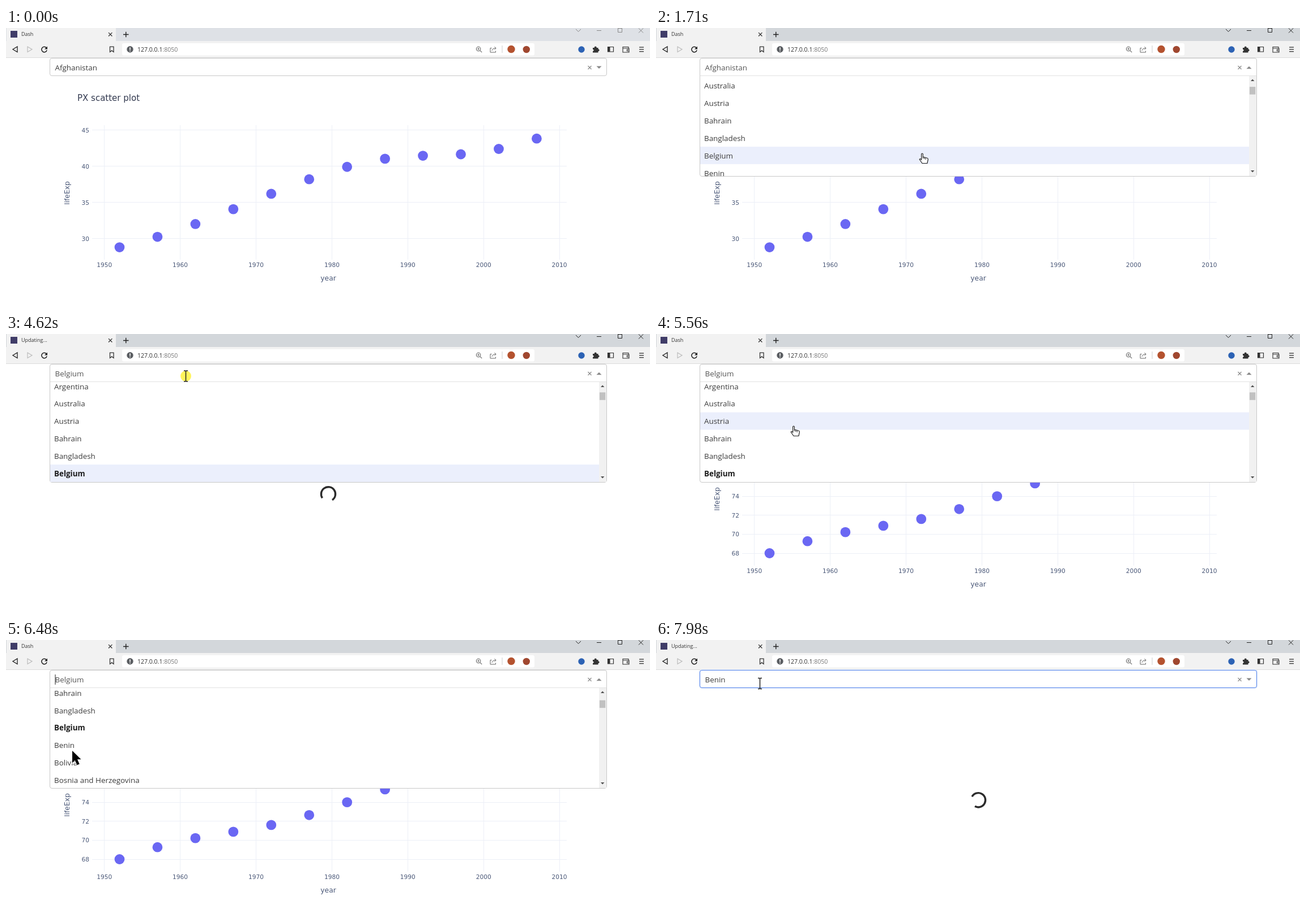
An HTML page with a canvas for the animation above (8000 ms loop, 1137 px wide and 492 px high).

```html
<!DOCTYPE html>
<html lang="en">
<head>
<meta charset="utf-8">
<title>Country chart</title>
<style>
html, body { margin: 0; width: 100%; height: 100%; overflow: hidden; background: #fff; }
canvas { display: block; }
</style>
</head>
<body>
<canvas id="stage" width="1137" height="492"></canvas>
<script>
const c = document.getElementById('stage').getContext('2d');
const LOOP = 8000, ROW = 30.83, LIST_TOP = 80.6, BLINK = 530;
const UI = '"Open Sans", "Noto Sans", sans-serif', PLOT = '"DejaVu Sans", sans-serif';
const countries = ['Afghanistan', 'Albania', 'Algeria', 'Angola', 'Argentina', 'Australia', 'Austria',
  'Bahrain', 'Bangladesh', 'Belgium', 'Benin', 'Bolivia', 'Bosnia and Herzegovina', 'Botswana', 'Brazil'];

// Each visit: menu opens, caret starts blinking, wheel turns, country is picked
const visits = [
  { open: 660, caret: 660, wheel: [1150, 1560], from: 0, by: 148, pick: 2130, before: 0, after: 9 },
  { open: 4600, caret: 5020, wheel: [5865, 6480], from: 127, by: 91.3, pick: 6860, before: 9, after: 10 }
];
const LOADED = 5250, TITLE_RESET = 5500;

// A straight trend plus sine waves that vanish at both ends
const charts = {
  0: { ends: [28.8, 43.83], waves: [2.25, -.22, -.67, .21, -.12], from: 30, to: 45, step: 5, y0: 372.7, unit: 12.8 },
  9: { ends: [68, 79.44], waves: [-.2, -.14, .22, .21], from: 68, to: 80, step: 2, y0: 388, unit: 16.82 }
};

// Pointer journey: depart, arrive, x, y
const home = [500, 72];
const trips = [[830, 1080, 495, 166], [1300, 1580, 470, 222], [2200, 2780, 293.5, 77.5], [2900, 3650, 317.5, 74.5],
  [4750, 5290, 243, 163], [5930, 6400, 117, 196], [6920, 7550, 183.5, 77]];

const progress = (t, a, b) => Math.min(1, Math.max(0, (t - a) / (b - a)));
const smooth = u => u * u * (3 - 2 * u);
const easeOut = u => 1 - (1 - u) ** 3;

function pointer(t) {
  return trips.reduce(([x, y], [a, b, tx, ty]) => {
    const u = smooth(progress(t, a, b));
    return [x + (tx - x) * u, y + (ty - y) * u];
  }, home);
}

function rect(x, y, w, h, color) {
  c.fillStyle = color;
  c.fillRect(x, y, w, h);
}
function box(x, y, w, h, r, fill, stroke) {
  c.beginPath();
  c.roundRect(x, y, w, h, r);
  if (fill) { c.fillStyle = fill; c.fill(); }
  if (stroke) { c.strokeStyle = stroke; c.lineWidth = 1; c.stroke(); }
}
function disc(x, y, r, color) {
  c.beginPath();
  c.arc(x, y, r, 0, 7);
  c.fillStyle = color;
  c.fill();
}
function line(d, color = '#333', width = 1.2) {
  c.strokeStyle = color;
  c.lineWidth = width;
  c.stroke(new Path2D(d));
}
function shape(d, color) {
  c.fillStyle = color;
  c.fill(new Path2D(d));
}
function cross(x, y, r, color, width) {
  line(`M${x - r} ${y - r}l${2 * r} ${2 * r}m0 ${-2 * r}l${-2 * r} ${2 * r}`, color, width);
}
// Triangle with its base centred on x, y; negative h points up
function triangle(x, y, w, h, color) {
  shape(`M${x - w / 2} ${y}h${w}l${-w / 2} ${h}z`, color);
}
function text(s, x, y, font, color, align = 'left') {
  c.font = font;
  c.fillStyle = color;
  c.textAlign = align;
  c.fillText(s, x, y);
}

function browser(active, title) {
  rect(0, 0, 1137, 24, active ? '#d3d7db' : '#dee1e6');
  rect(0, 23, 1137, 29, '#f2f2f2');
  box(1, -4, 193, 30, 4, '#f2f2f2');
  rect(0, 52, 1137, 1, '#dcdcdc');
  rect(8, 5, 12, 12, '#403d68');
  text(title, 27, 14.3, '9px ' + UI, '#333');
  cross(184.2, 11.3, 3.2, '#333', 1.3);
  line('M207 11.5h9.5m-4.75-4.75v9.5', '#222', 1.4);

  const control = active ? '#222' : '#888';
  line('M1006 2l4.5 4.5 4.5-4.5M1043 4.5h8M1080.5.5h7v7h-7z', control, 1);
  cross(1121, 4.5, 4, control, 1);

  line('M20 33v9.5l-8-4.75z', '#222', 1.3);
  line('M38 33v9.5l8-4.75z', '#bbb');
  line('M71.3 35.2a4.7 4.7 0 1 0 .8 4', '#222', 1.5);
  shape('M73 32.5v5h-5z', '#222');
  line('M183.5 33.2h6.5v9.3l-3.25-2.6-3.25 2.6z', '#333', 1.3);

  box(205, 27, 728, 21.5, 3, '#fff');
  disc(219, 37.8, 5.7, '#5a5d61');
  rect(218.2, 34.3, 1.6, 4.6, '#fff');
  rect(218.2, 40, 1.6, 1.5, '#fff');
  const font = '10.5px ' + UI;
  text('127.0.0.1', 232, 41.5, font, '#333');
  text(':8050', 232 + c.measureText('127.0.0.1').width, 41.5, font, '#777');

  line('M837.8 37a3.7 3.7 0 1 1-7.4 0a3.7 3.7 0 1 1 7.4 0m-1 2.7l3.4 3.4M832.3 37h3.6m-1.8-1.8v3.6', '#666', 1.1);
  line('M857.5 35.5h-2.5v7.5h9.5v-2.5M858 40q.5-4 7-4.3m-2.5-2.5l2.7 2.5-2.7 2.5', '#666', 1);
  rect(875.5, 31, 1, 13, '#ccc');
  disc(892, 37.5, 6.7, '#b4522f');
  disc(918.8, 38, 6.2, '#a0472f');
  disc(1016, 38, 5.7, '#2c62b4');
  rect(1036, 35, 9.5, 8.5, '#333');
  disc(1040.7, 34.5, 2, '#333');
  disc(1045.5, 39.3, 2, '#333');
  disc(1036, 39.3, 1.6, '#f2f2f2');
  line('M1062.5 33.5h10v8.5h-10z');
  rect(1063, 34, 3.5, 8, '#333');
  line('M1099 35.5v-2h-10v9.5h11v-7h-11M1100 38h-3.5v2.7h3.5', '#333', 1.1);
  for (let i = 0; i < 3; i++) rect(1118, 33.4 + i * 3.8, 8, 1.3, '#333');
}

function plot({ ends: [a, b], waves, from, to, step, y0, unit }) {
  const ink = '#4a5878', grid = '#eceff7', tick = '10.6px ' + PLOT, label = '12.3px ' + PLOT;
  const px = year => 173.7 + (year - 1950) * 13.39;
  const py = v => y0 - (v - from) * unit;
  text('PX scatter plot', 126, 129, '15px ' + PLOT, '#333a50');
  for (let year = 1950; year <= 2010; year += 10) {
    rect(Math.floor(px(year)), 172, 1, 238, grid);
    text(year, px(year), 422.5, tick, ink, 'center');
  }
  for (let v = from; v <= to; v += step) {
    rect(152, Math.floor(py(v)), 838, 1, grid);
    text(v, 147, py(v) + 4, tick, ink, 'right');
  }
  text('year', 569, 447, label, ink, 'center');
  c.save();
  c.translate(111.5, 292);
  c.rotate(-Math.PI / 2);
  text('lifeExp', 0, 0, label, ink, 'center');
  c.restore();
  for (let year = 1952; year <= 2007; year += 5) {
    const u = (year - 1952) / 55;
    const v = waves.reduce((sum, w, k) => sum + w * Math.sin((k + 1) * Math.PI * u), a + (b - a) * u);
    disc(px(year), py(v), 8.9, '#6a67f3');
  }
}

function spinner(age) {
  const turn = age / 750 * 2 * Math.PI;
  c.beginPath();
  c.arc(569, 283.3, 12.6, turn + Math.PI / 4, turn + Math.PI * 7 / 4);
  c.strokeStyle = '#2b2b2b';
  c.lineWidth = 3.4;
  c.stroke();
}

function control(name, open, focus, caret) {
  if (focus) box(76, 52, 986, 34, 4.5, '#e6effd');
  box(77.5, 53.5, 983, 31, open ? [3.5, 3.5, 0, 0] : 3.5, '#fff', focus ? '#4f80ea' : '#c8c8c8');
  text(name, 86.5, 74.7, '13.4px ' + UI, open ? '#555' : '#3c3c3c');
  if (caret) rect(86.5, 61, 1, 18, '#222');
  cross(1030.5, 70, 3, '#888', 1.2);
  triangle(1047, open ? 72.3 : 67.5, 9, open ? -4.5 : 4.5, '#888');
}

function menu(scroll, selected, hover) {
  box(77.5, 84.5, 983, 178, [0, 0, 3.5, 3.5], '#fff', '#c8c8c8');
  rect(78, 84, 982, 1, '#e2e2e2');
  c.save();
  c.beginPath();
  c.rect(78, 85, 982, 177);
  c.clip();
  countries.forEach((name, i) => {
    const y = LIST_TOP + i * ROW - scroll, bold = i === selected;
    if (i === hover) rect(78, y, 969, ROW, '#ebeffc');
    text(name, 85, Math.round(y + 20.6), (bold ? '700 ' : '') + '13.4px ' + UI, bold ? '#1c1c1c' : '#3c3c3c');
  });
  rect(1047, 85, 13, 177, '#f1f1f1');
  rect(1048, 98.7 + scroll * 0.0365, 10.3, 13.5, '#c1c1c1');
  triangle(1053.2, 94, 6.4, -3.6, '#505050');
  triangle(1053.2, 252, 6.4, 3.6, '#505050');
  c.restore();
}

const cursors = {
  beam() {
    line('M-3.5-9.5h2.5l1 1 1-1h2.5M0-8.5v17M-3.5 9.5h2.5l1-1 1 1h2.5', '#222', 1.5);
  },
  arrow() {
    const d = 'M0 0v21.5l4.8-4.6 3.7 8.4 4.2-1.9-3.7-8.2h6.5z';
    line(d, '#fff', 1.5);
    shape(d, '#000');
  },
  hand() {
    const d = 'M-1.4 11V1q1.4-2 2.7 0v5l7 2q2 0 2 3l-1.4 6.5H0l-4.8-7q1-2 3.4.5z';
    shape(d, '#fff');
    line(d, '#222');
    for (let i = 0; i < 3; i++) line(`M${1.3 + 2.4 * i} ${6 + i}v3`, '#222', 1);
  }
};

function draw(t) {
  const visit = visits.find(v => t >= v.open && t < v.pick);
  const last = visits.filter(v => t >= v.pick).pop();
  const selected = last ? last.after : 0;
  const [x, y] = pointer(t);
  const wheeling = visit && t >= visit.wheel[0] && t < visit.wheel[1] + 20;

  rect(0, 0, 1137, 492, '#fff');
  browser(t >= 70, last && (t < TITLE_RESET || last === visits[1]) ? 'Updating...' : 'Dash');

  if (last && (t < LOADED || last === visits[1])) spinner(t - last.pick - 30);
  else plot(charts[selected]);

  const age = visit ? t - visit.caret : -1;
  control(countries[selected], visit, last && !visit, age >= 0 && age % (2 * BLINK) < BLINK);
  if (visit) {
    const scroll = visit.from + visit.by * easeOut(progress(t, ...visit.wheel));
    // The highlight sticks to its row when a scroll begins, then drops out
    const starting = wheeling && t < visit.wheel[0] + 150;
    const row = Math.floor((y - LIST_TOP + (starting ? visit.from : scroll)) / ROW);
    menu(scroll, selected, y < 85 ? selected : wheeling && !starting ? -1 : row);
  }

  if (t < 70) return;
  if (visits.some(v => Math.abs(t - v.open - 30) < 80 || Math.abs(t - v.pick) < 50)) disc(x, y, 9.5, '#fff45c');
  c.save();
  c.translate(x, y);
  cursors[y < 85 ? 'beam' : visit && !wheeling ? 'hand' : 'arrow']();
  c.restore();
}

const start = performance.now();
function tick() {
  draw((performance.now() - start) % LOOP);
  requestAnimationFrame(tick);
}
tick();
</script>
</body>
</html>
```
